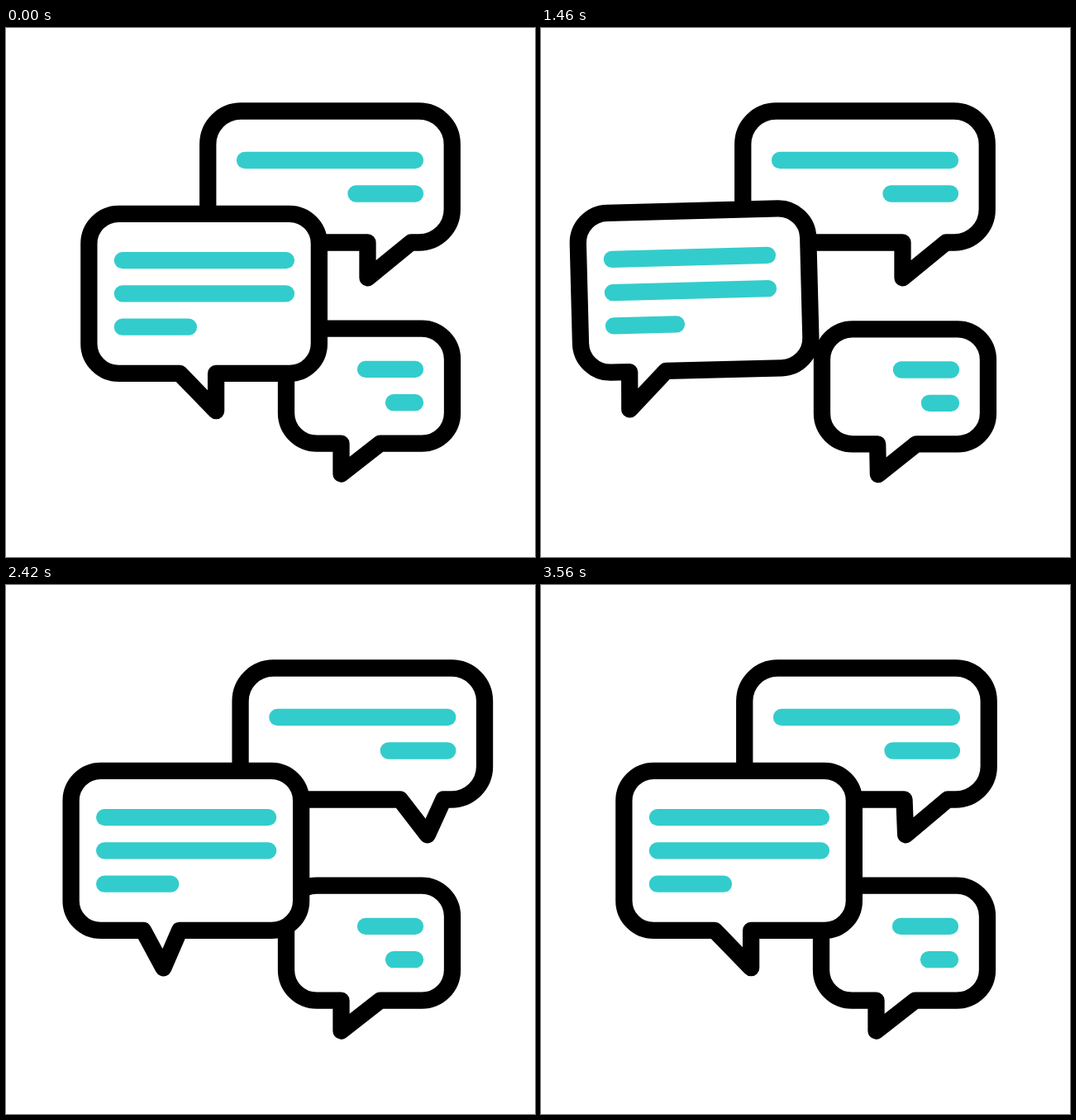
These frames come from a looping animation (640x640 px, 3.6 s). An HTML page with a canvas:

```html
<!DOCTYPE html>
<html lang="en">
<head>
<meta charset="utf-8">
<title>Chat bubbles</title>
<style>
  html, body { margin: 0; width: 100%; height: 100%; overflow: hidden; background: #fff; }
  canvas { display: block; width: 640px; height: 640px; }
</style>
</head>
<body>
<canvas id="stage" width="640" height="640"></canvas>
<script>
const ctx = document.getElementById('stage').getContext('2d');
const LOOP = 3600;
const TILT = 6 * Math.PI / 180;

// Positions inside a bubble are relative to the centre of its body.
// timing: leave, first swing begins, length of one swing, back at rest.
const bubbles = [
  { // upper right
    x: 392, y: 180, w: 295.5, h: 159, r: 40,
    move: [62.5, 0], pivot: [158, 133],
    base: [45.5, 98], baseShift: 0, tip: [45.5, 98], tipY: 122.3,
    lineX: 103, side: -1, lines: [[-20, 206], [20.5, 71.5]], shrink: 0.3,
    swing: 1, timing: [2225, 2535, 180, 3570]
  },
  { // lower right
    x: 439.5, y: 433.2, w: 201, h: 139, r: 37,
    move: [57.3, 35.2], pivot: [110.5, 116],
    base: [-34, 13], baseShift: 42.5, tip: [-34, 55], tipY: 106.3,
    lineX: 55.5, side: -1, lines: [[-20.3, 60], [20, 26]], shrink: 0.4,
    swing: -1, timing: [0, 235, 217.5, 1466]
  },
  { // left, in front
    x: 239.6, y: 321.4, w: 278.5, h: 193, r: 36,
    move: [-50, 0], pivot: [-149.5, 151.5],
    base: [-29.5, 14.5], baseShift: -51.5, tip: [14.5, -82], tipY: 141.8,
    lineX: -98.7, side: 1, lines: [[-40.3, 198], [0, 198], [40.3, 80]], shrink: 0.2,
    swing: -1, timing: [1105, 1409, 204, 2570]
  }
];

const clamp = (v, lo, hi) => Math.min(hi, Math.max(lo, v));
const mix = (a, b, p) => a + (b - a) * p;

function sample(values, u) {
  const i = clamp(Math.floor(u), 0, values.length - 2);
  return mix(values[i], values[i + 1], clamp(u - i, 0, 1));
}

function pose(b, t) {
  const [leave, settle, beat, home] = b.timing;
  const back = settle + 4 * beat;
  const u = (t - settle) / beat;
  const out = t < back
    ? clamp((t - leave) / (settle - leave), 0, 1)
    : clamp((home - t) / (home - back), 0, 1);
  return {
    out,
    angle: TILT * b.swing * sample([0, 1, -1, 1, 0], u),
    length: 1 - b.shrink * sample([0, 1, 0, 1, 0], u)
  };
}

function outline(b, out) {
  const x = b.w / 2, y = b.h / 2;
  const [left, right] = b.base.map(v => v + b.baseShift * out);
  ctx.beginPath();
  ctx.moveTo(left, y);
  ctx.arcTo(-x, y, -x, -y, b.r);
  ctx.arcTo(-x, -y, x, -y, b.r);
  ctx.arcTo(x, -y, x, y, b.r);
  ctx.arcTo(x, y, right, y, b.r);
  ctx.lineTo(right, y);
  ctx.lineTo(mix(b.tip[0], b.tip[1], out), b.tipY);
  ctx.closePath();
}

function drawBubble(b, t) {
  const { out, angle, length } = pose(b, t);
  const [px, py] = b.pivot;
  ctx.save();
  ctx.translate(b.x + b.move[0] * out + px, b.y + b.move[1] * out + py);
  ctx.rotate(angle);
  ctx.translate(-px, -py);

  outline(b, out);
  ctx.fillStyle = '#fff';
  ctx.fill();
  ctx.strokeStyle = '#000';
  ctx.stroke();

  ctx.strokeStyle = '#33cccc';
  for (const [y, w] of b.lines) {
    ctx.beginPath();
    ctx.moveTo(b.lineX, y);
    ctx.lineTo(b.lineX + b.side * w * length, y);
    ctx.stroke();
  }
  ctx.restore();
}

function draw(t) {
  ctx.fillStyle = '#fff';
  ctx.fillRect(0, 0, 640, 640);
  ctx.lineWidth = 20.3;
  ctx.lineCap = ctx.lineJoin = 'round';
  bubbles.forEach(b => drawBubble(b, t));
}

let start;
function tick(now) {
  start ??= now;
  draw((now - start) % LOOP);
  requestAnimationFrame(tick);
}
draw(0);
requestAnimationFrame(tick);
</script>
</body>
</html>
```
